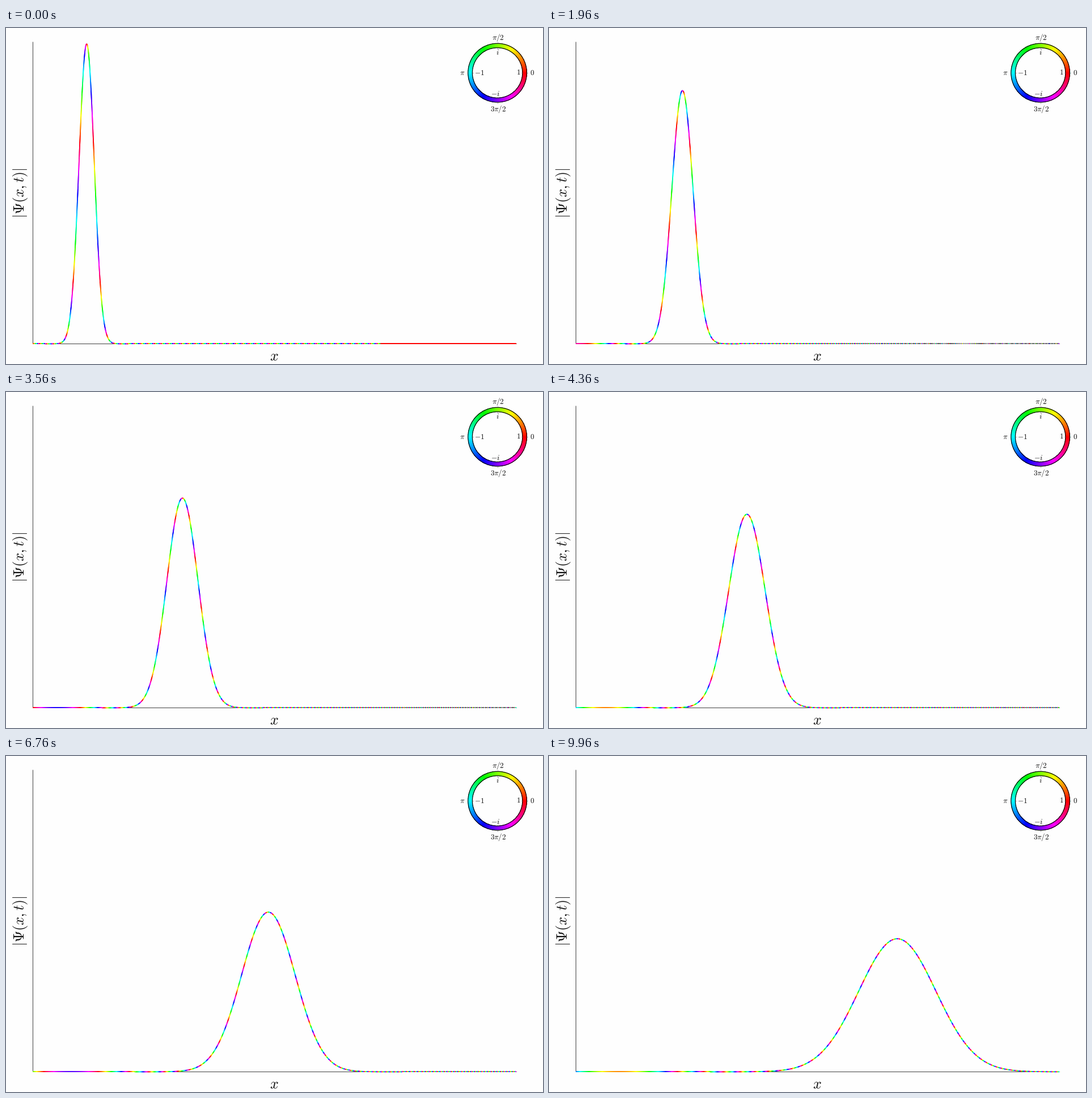
These frames come from a looping animation (947x592 px, 10000 ms). A matplotlib script:

```python
import numpy as np
import matplotlib.pyplot as plt
from matplotlib.animation import FuncAnimation
from matplotlib.collections import LineCollection, PolyCollection
from matplotlib.colors import hsv_to_rgb
from matplotlib.patches import Circle

W, H, DPI = 947, 592, 64
FRAME_MS, LOOP_MS = 40, 10000
STEPS = 300  # simulation steps per loop
PT = 72 / DPI  # points per pixel

plt.rcParams["mathtext.fontset"] = "cm"

# Plot area in pixels, and the range of x it covers
LEFT, RIGHT, TOP, BASE = 47.5, 900, 24, 556.4
X_MIN, X_MAX = -10, 80
SCALE = (RIGHT - LEFT) / (X_MAX - X_MIN)
PEAK = 528.4

# Free Gaussian packet with hbar = m = sigma = 1
K0, T_END = 5, 10
SAMPLES = 1500
GRID = np.linspace(X_MIN, X_MAX, 6000)

fig = plt.figure(figsize=(W / DPI, H / DPI), dpi=DPI, facecolor="#fefefe")
ax = fig.add_axes([0, 0, 1, 1])
ax.set_xlim(0, W)
ax.set_ylim(H, 0)
ax.set_autoscale_on(False)
ax.axis("off")


def line(xs, ys, width=1.0, color="#404040", z=1):
    ax.plot(xs, ys, color=color, lw=width * PT, zorder=z,
            solid_capstyle="butt")


def label(x, y, tex, size, **kw):
    ax.text(x, y, f"${tex}$", size=size * PT, ha="center", va="center",
            color="#111111", zorder=5, **kw)


def hue_rgb(hue):
    one = np.ones_like(hue)
    return hsv_to_rgb(np.stack([hue, one, one], axis=-1))


def amplitude(x, t):
    spread = 1 + (t / 2) ** 2
    return np.exp(-(x - K0 * t) ** 2 / (4 * spread)) / spread ** 0.25


def phase(x, t):
    tau = t / 2
    chirp = tau * (x - K0 * t) ** 2 / (4 * (1 + tau ** 2))
    return K0 * x - K0 ** 2 * t / 2 + chirp - np.arctan(tau) / 2


def to_pixels(x, amp):
    return LEFT + (x - X_MIN) * SCALE, BASE - PEAK * amp


def draw_phase_wheel(cx=866.6, cy=79, inner=44.2, outer=51.8):
    edges = np.linspace(0, 2 * np.pi, 241)
    parts = []
    for a, b in zip(edges[:-1], edges[1:]):
        ang = np.array([a, b + 0.01, b + 0.01, a])
        rad = np.array([inner, inner, outer, outer])
        parts.append(np.column_stack([cx + rad * np.cos(ang),
                                      cy - rad * np.sin(ang)]))
    colors = hue_rgb((edges[:-1] + edges[1:]) / (4 * np.pi))
    ax.add_collection(PolyCollection(parts, facecolors=colors,
                                     edgecolors="none", antialiaseds=False,
                                     zorder=3), autolim=False)
    for r in (inner, outer):
        ax.add_patch(Circle((cx, cy), r, fill=False, ec="black",
                            lw=1.2 * PT, zorder=4))
    for dx, dy in ((1, 0), (0, 1), (-1, 0), (0, -1)):
        for r0, r1 in ((inner - 2, inner), (outer, outer + 2)):
            line([cx + dx * r0, cx + dx * r1], [cy + dy * r0, cy + dy * r1],
                 0.7, "#606060", z=4)
    for x, y, tex in ((867.5, 16.5, r"\pi/2"), (867, 43.5, "i"),
                      (804.5, 79.5, r"\pi"), (835, 79.5, "-1"),
                      (904, 79, r"\mathbf{1}"), (928.5, 79.5, "0"),
                      (862.5, 116, "-i"), (868.5, 143, r"3\pi/2")):
        label(x, y, tex, 13)


draw_phase_wheel()
line([LEFT, LEFT], [TOP, BASE])
line([LEFT, RIGHT], [555.5, 555.5])
label(26, 290, r"|\Psi(x,t)|", 25.8, rotation=90)
label(473, 579.2, "x", 26)

curve = LineCollection([], linewidths=1.75 * PT, zorder=3)
ax.add_collection(curve, autolim=False)


def update(frame):
    # A step becomes visible at its start time cut to whole hundredths
    step = (3 * (frame * FRAME_MS + 10) - 1) // 100
    t = T_END * step / STEPS
    # Even spacing along the curve keeps the colours smooth on steep flanks
    gx, gy = to_pixels(GRID, amplitude(GRID, t))
    arc = np.append(0, np.cumsum(np.hypot(np.diff(gx), np.diff(gy))))
    x = np.interp(np.linspace(0, arc[-1], SAMPLES), arc, GRID)
    amp = amplitude(x, t)
    hue = np.where(amp > 0, phase(x, t) / (2 * np.pi) % 1, 0)
    pts = np.column_stack(to_pixels(x, amp))
    # Each piece reaches under the next one, so no seams show
    curve.set_segments(np.stack([pts[:-2], pts[1:-1], pts[2:]], axis=1))
    curve.set_color(hue_rgb(hue[:-2]))
    return (curve,)


anim = FuncAnimation(fig, update, frames=LOOP_MS // FRAME_MS,
                     interval=FRAME_MS, repeat=True, repeat_delay=0,
                     blit=False)
plt.show()
```
